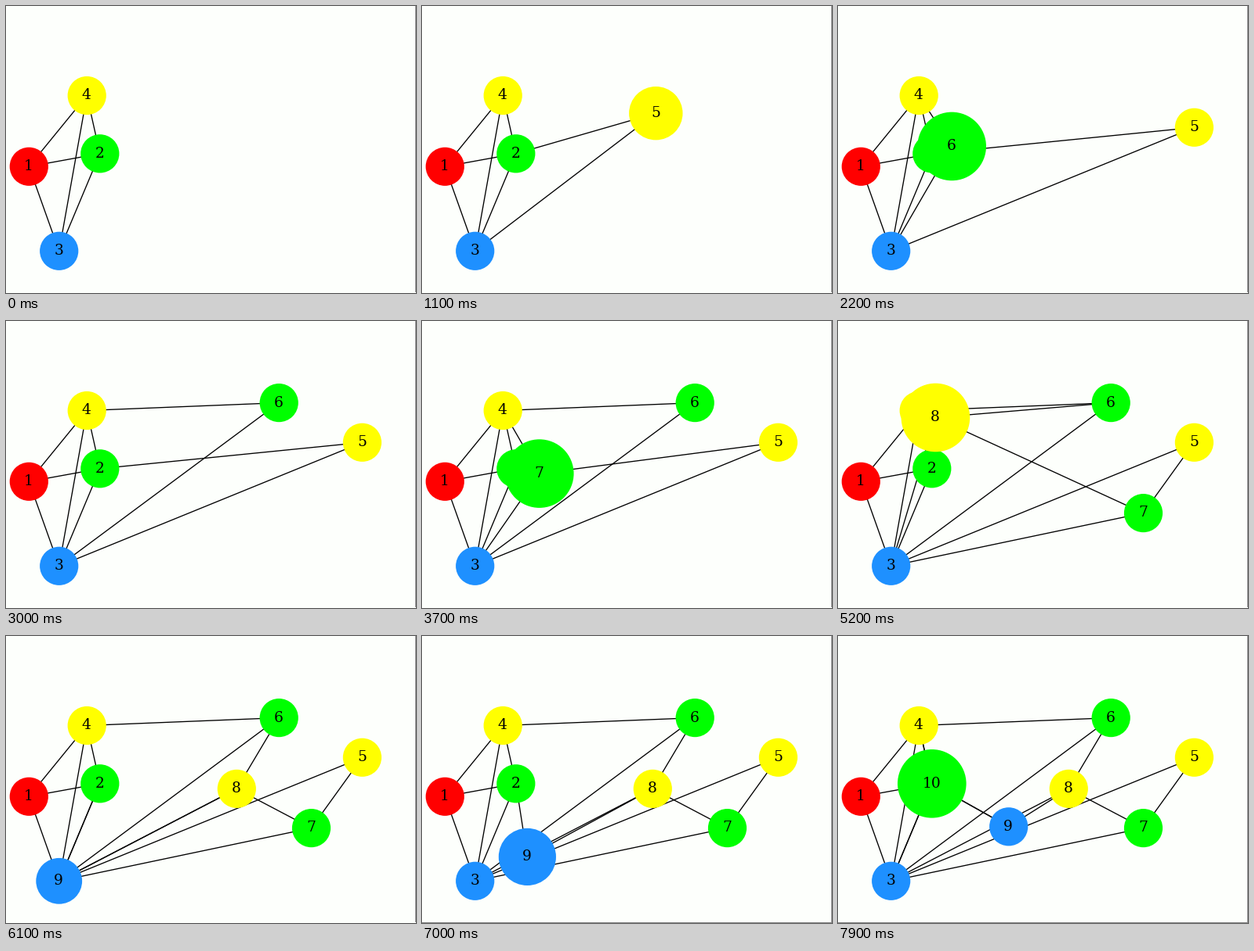
A matplotlib script that plays this animation: 523x367 px, repeating every 8000 ms.

```python
from itertools import combinations

import matplotlib.pyplot as plt
from matplotlib.animation import FuncAnimation
from matplotlib.collections import LineCollection
from matplotlib.patches import Circle, Rectangle

W, H, DPI = 523, 367, 100
PX = 72 / DPI  # points per pixel
FRAMES, INTERVAL = 80, 100
GROW, MOVE = 5, 10
PERIOD = GROW + MOVE
RADIUS, RIM, MARGIN = 24, 0.6, 4
FONT, DIGIT = 18.67, 0.636  # font size in px, digit advance in em

BACK, BORDER = "#fdfffc", "#858585"
PALETTE = ["#ff0000", "#00ff00", "#1e90ff", "#ffff00"]

# Resting places of nodes 1, 2, 3, ...
SPOTS = [(29.3, 205.3), (119.8, 188.8), (67.7, 313.3),
         (103.2, 114.5), (454.4, 155.3), (348.2, 104.6),
         (389.5, 245.6), (294.3, 195.4), (217.7, 243.8)]
# Each new node: its parent and the neighbours it takes, in turning order.
# The inner neighbours are handed over, the outer two stay shared.
SPLITS = [(4, (2, 3)), (2, (3, 4)), (2, (3, 5, 4)),
          (4, (3, 7, 6)), (3, (2, 8)), (2, (3, 9, 4))]

home = dict(enumerate(SPOTS, 1))
color = dict(enumerate(PALETTE, 1))
for child, (parent, _) in enumerate(SPLITS, len(PALETTE) + 1):
    color[child] = color[parent]
    home.setdefault(child, home[parent])


def child_state(step, start, end):
    """Position and scale of a node that swells, then travels and shrinks."""
    if step <= GROW:
        return start, 1 + step / GROW
    k = min(step - GROW, MOVE)
    t = (k - 1) / (MOVE - 1)
    return tuple(a + (b - a) * t for a, b in zip(start, end)), 2 - k / MOVE


def graph_at(frame):
    first = range(1, len(PALETTE) + 1)
    nodes = {n: (home[n], 1) for n in first}
    edges = {frozenset(pair) for pair in combinations(first, 2)}
    for i, (parent, links) in enumerate(SPLITS):
        step = frame - PERIOD * i
        if step < 1:
            break
        child = len(nodes) + 1
        nodes[child] = child_state(step, home[parent], home[child])
        edges |= {frozenset((child, n)) for n in links}
        if step > GROW:
            edges -= {frozenset((parent, n)) for n in links[1:-1]}
    return nodes, edges


def page_bottom(frame):
    """Lowest page edge reached so far in the loop."""
    return max(y + RADIUS * s + MARGIN
               for f in range(frame + 1)
               for (_, y), s in graph_at(f)[0].values())


fig = plt.figure(figsize=(W / DPI, H / DPI), dpi=DPI, facecolor=BACK)
ax = fig.add_axes([0, 0, 1, 1])


def bar(x, y, w, h):
    ax.add_patch(Rectangle((x, y), w, h, fc=BORDER, lw=0, antialiased=False))


def draw_node(name, x, y, scale, z):
    ax.add_patch(Circle((x, y), RADIUS * scale + RIM, fc=color[name],
                        lw=0, zorder=z))
    label = str(name)
    half = len(label) * DIGIT * FONT / 2
    # the pen snaps down to a whole pixel
    ax.text(x - half - 0.45, y + 4.9, label, family="DejaVu Serif",
            size=FONT * PX, ha="left", va="baseline", zorder=z)


def draw(frame):
    ax.clear()
    ax.set_xlim(0, W)
    ax.set_ylim(H, 0)
    ax.axis("off")

    bar(W - 1, 0, 1, H - 1)
    if page_bottom(frame) > H - 2:
        bar(0, H - 1, W, 1)

    nodes, edges = graph_at(frame)
    lines = [[nodes[n][0] for n in edge] for edge in edges]
    ax.add_collection(LineCollection(lines, colors="black",
                                     linewidths=1.33 * PX, zorder=2))
    for z, (name, ((x, y), scale)) in enumerate(nodes.items(), 3):
        draw_node(name, x, y, scale, z)
    return []


anim = FuncAnimation(fig, draw, frames=FRAMES, interval=INTERVAL,
                     init_func=lambda: [], repeat=True, repeat_delay=0)
plt.show()
```
